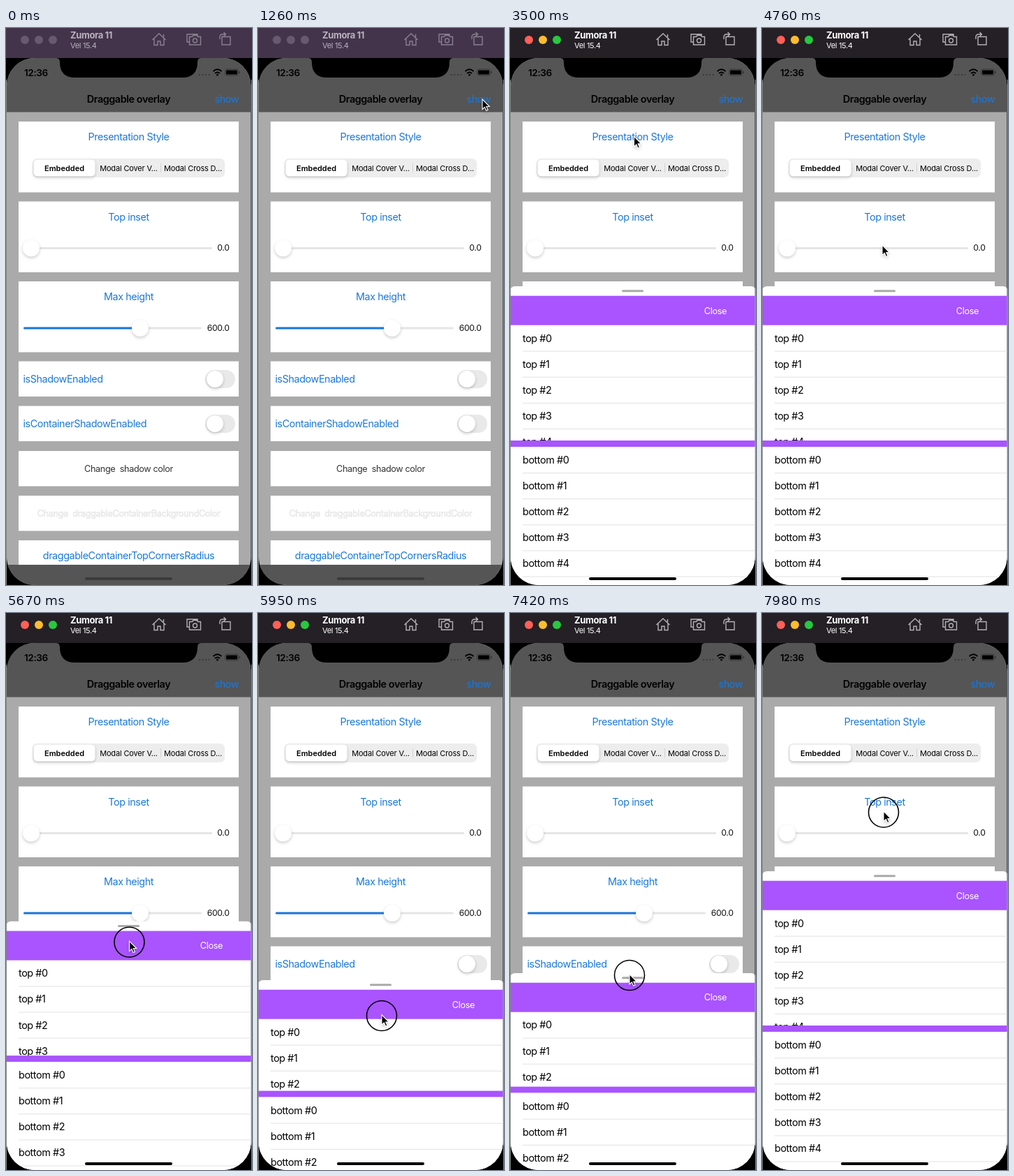
These frames come from a looping animation (352x798 px, 8 s). An HTML page:

```html
<!DOCTYPE html>
<html>
<head>
<meta charset="utf-8">
<style>
html, body { margin: 0; width: 100%; height: 100%; overflow: hidden; background: #000; }
svg { display: block; width: 352px; height: 798px; }
text { font-family: Inter, "Liberation Sans", sans-serif; letter-spacing: -.03em; white-space: pre; }
#bar { fill: #43344b; --text: #b9b1bd; --icon: #8b7f92; --off: #68596f; }
#bar.active { fill: #242026; --text: #fff; --icon: #b4b1b6; --off: none; }
#bar text { fill: var(--text); }
#bar .icon { fill: none; stroke: var(--icon); stroke-width: 1.4; }
#bar circle { fill: var(--off); }
#bar.active circle { fill: var(--on); }
.soft { filter: drop-shadow(0 2px 2px #0003); }
</style>
</head>
<body>
<svg id="stage" viewBox="0 0 352 798"></svg>
<script>
const BLUE = '#1a78dc', PURPLE = '#a954ff', ROW = 37.1, TOP = 370, REST = 521;

const text = (x, y, s, size = 14.4, fill = '#000', weight = 400, anchor = 'start', extra = '') =>
  `<text x="${x}" y="${y}" font-size="${size}" fill="${fill}" font-weight="${weight}" text-anchor="${anchor}" ${extra}>${s}</text>`;
const rect = (x, y, w, h, fill, r = 0, extra = '') =>
  `<rect x="${x}" y="${y}" width="${w}" height="${h}" rx="${r}" fill="${fill}" ${extra}/>`;
const disc = (x, y, r, extra = 'fill="#fff" class="soft"') => `<circle cx="${x}" cy="${y}" r="${r}" ${extra}/>`;
const card = (y, h) => rect(18, y, 315, h, '#fff');
const heading = (y, s) => text(175.5, y, s, 14.4, BLUE, 400, 'middle');

const slider = (y, from, to, thumb, label) =>
  rect(from, y - 1.5, to - from, 3, '#e5e5e6', 1.5) +
  rect(from, y - 1.5, thumb - from, 3, BLUE, 1.5) +
  disc(thumb, y, 12) + text(319.5, y + 3.5, label, 12.2, '#111', 400, 'end');

const toggle = (y, label) =>
  card(y - 25.5, 50.5) + text(24.5, y + 5, label, 14.4, BLUE) +
  rect(285, y - 13, 43, 26, '#e9e9ea', 13) + disc(299, y, 12);

const rows = name => [0, 1, 2, 3, 4, 5].map(i =>
  text(18, 24 + i * ROW, `${name} #${i}`) +
  rect(18, (i + 1) * ROW, 333, 1, '#e2e2e3')).join('');

const titleBar = `<g id="bar">
  <rect width="352" height="43"/>
  ${['#fe5f57', '#febc2e', '#28c840'].map((c, i) => disc(27 + i * 20, 17, 6, `style="--on:${c}"`)).join('')}
  ${text(92, 15, 'Zumora 11', 13, '', 700)}
  ${text(92, 29, 'Vel 15.4', 11)}
  <path class="icon" d="M209.5 17L219 8l9.5 9M212 15v9.5h5V19h4v5.5h5V15M225.500 13V9"/>
  <path class="icon" d="M262 20h-3V9h15v2M262.500 12.500h4l1.500-2h5l1.500 2h4V24h-16Z"/>
  <circle cx="270.500" cy="18" r="3" class="icon" style="fill:none"/>
  <path class="icon" d="M309 12.500h12V24h-12ZM306 16v-3q0-4 4-4h4M311.500 6l3 3-3 3"/>
</g>`;

const statusBar = `
  <path d="M72 43q5 0 5 6 0 22 22 22H252q22 0 22-22 0-6 5-6Z"/>
  ${text(26, 68.5, '12:36', 13.6, '#000', 600)}
  ${[277, 281.5, 286, 290.500].map(x => disc(x, 67, 1, 'fill="#333"')).join('')}
  <path d="M296.500 62q6-5.500 12 0M299 65q3.500-3 7 0" fill="none" stroke="#000" stroke-width="1.8"/>
  ${disc(302.5, 67.2, 1.4, '')}
  ${rect(313.5, 59, 19, 9, 'none', 2.5, 'stroke="#333" stroke-width=".8"')}
  ${rect(315, 60.5, 16, 6, '#000', 1.3)}${rect(333.5, 62, 1.3, 3, '#333')}`;

const settings = `
  ${rect(0, 43, 352, 755, '#aaa')}${rect(0, 43, 352, 77.5, '#555')}
  ${statusBar}
  ${text(175.5, 107, 'Draggable overlay', 14.4, '#000', 600, 'middle')}
  ${text(333, 107, 'show', 14.4, BLUE, 400, 'end')}
  ${card(134, 101.5)}${heading(161, 'Presentation Style')}
  ${rect(38, 187, 275, 27, '#ededee', 6.5)}
  ${rect(39.5, 188.5, 88, 24, '#fff', 5.5, 'class="soft"')}
  ${rect(221, 194, 1, 13, '#d3d3d5')}
  ${text(83.5, 204.5, 'Embedded', 11, '#000', 600, 'middle', 'style="letter-spacing:0"')}
  ${text(175.5, 204.5, 'Modal Cover V...', 11, '#000', 400, 'middle', 'style="letter-spacing:-.015em"')}
  ${text(267.5, 204.5, 'Modal Cross D...', 11, '#000', 400, 'middle', 'style="letter-spacing:-.015em"')}
  ${card(248.5, 101.5)}${heading(276, 'Top inset')}${slider(315.5, 25, 295, 36, '0.0').replace(BLUE, '#e5e5e6')}
  ${card(363, 101.5)}${heading(390, 'Max height')}${slider(430, 25, 280, 192, '600.0')}
  ${toggle(503, 'isShadowEnabled')}${toggle(567, 'isContainerShadowEnabled')}
  ${card(606, 50.5)}${text(175.5, 636, 'Change  shadow color', 12.7, '#333', 400, 'middle')}
  ${card(670, 50.5)}
  ${text(175.5, 700, 'Change  draggableContainerBackgroundColor', 12.7, '#f6f6f6', 400, 'middle', 'stroke="#dedede" stroke-width=".5"')}
  ${card(734, 40)}${heading(761, 'draggableContainerTopCornersRadius')}
  ${rect(0, 769, 352, 29, '#555')}`;

const sheetMarkup = `<g id="sheet">
  ${rect(0, 0, 352, 500, '#fff', 7)}
  ${rect(160, 5.2, 31, 3, '#a9a9a9', 1.5)}
  ${rect(0, 13.7, 352, 42, PURPLE)}
  ${text(310, 39.5, 'Close', 12.7, '#fff', 400, 'end')}
  <g transform="translate(0 55.500)">${rows('top')}</g>
  <g id="lower">${rect(0, -9, 352, 9, PURPLE)}${rect(0, 0, 352, 500, '#fff')}${rows('bottom')}</g>
</g>`;

const $ = id => document.getElementById(id);
$('stage').innerHTML = `
  <clipPath id="screen">${rect(1, 43, 349.5, 755, '#000', 40)}</clipPath>
  ${rect(0, 0, 352, 798, '#000')}
  ${rect(0, 74, 1, 724, '#858585')}${rect(351, 74, 1, 724, '#858585')}
  <g clip-path="url(#screen)">${settings}${sheetMarkup}
    ${rect(113, 787, 125, 4, '#3b3b3b', 2, 'id="home"')}</g>
  ${titleBar}
  <g id="pointer">
    <circle id="press" cy="1.500" r="21.500" fill="none" stroke="#000" stroke-width="1.600"/>
    <path class="soft" d="M0 0V14.500L3.400 11.400 5.600 16.500 8 15.500 5.800 10.500H10.300Z" stroke="#fff" stroke-width="1.100"/>
  </g>`;

// Each key is [time, ...values]; motion eases in and out between neighbours.
const pointerKeys = [
  [680, 66, 490], [1190, 321, 102], [2200, 321, 102], [2520, 200, 374], [2590, 200, 374], [2940, 179, 347],
  [3040, 179, 347], [3260, 190, 382], [3560, 176, 130], [3850, 182, 380], [4150, 174, 165],
  [4410, 178, 380], [4480, 178, 380], [4690, 172, 298], [4760, 172, 311], [5180, 176, 380],
  [5420, 176, 380], [5950, 177, 575.5], [6160, 177, 595], [6330, 177, 595], [6960, 172, 524],
  [7330, 171, 523], [7420, 171, 517.5], [7940, 174, 284]];
const sheetKeys = [
  [5420, TOP], [5950, 526], [6160, 541], [6270, 541], [6560, REST],
  [7330, REST], [7420, 516], [7700, TOP]];

function at(keys, t) {
  const i = keys.findIndex(k => k[0] > t);
  if (i < 0) return keys.at(-1).slice(1);
  if (i === 0) return keys[0].slice(1);
  const a = keys[i - 1], b = keys[i], p = (t - a[0]) / (b[0] - a[0]), e = p * p * (3 - 2 * p);
  return a.slice(1).map((v, j) => v + (b[j + 1] - v) * e);
}
const between = (t, a, b) => t >= a && t < b;
const move = (id, x, y) => $(id).setAttribute('transform', `translate(${x} ${y})`);
const show = (id, on) => $(id).setAttribute('visibility', on ? 'visible' : 'hidden');

function draw(t) {
  const [x, y] = at(pointerKeys, t), [drag] = at(sheetKeys, t);
  const rise = Math.min(1, Math.max(0, (t - 1710) / 420));
  const top = drag + (800 - TOP) * (1 - rise) ** 3;
  move('sheet', 0, top);
  move('lower', 0, 230 - .4 * (drag - TOP));
  move('pointer', x, y);
  show('pointer', t >= 700);
  show('press', between(t, 1400, 1540) || between(t, 5180, 6270) || t >= 7350);
  $('bar').setAttribute('class', t >= 1400 ? 'active' : '');
  $('home').setAttribute('fill', top < 785 ? '#000' : '#3b3b3b');
}

function tick() {
  draw(performance.now() % 8000);
  requestAnimationFrame(tick);
}
tick();
</script>
</body>
</html>
```
